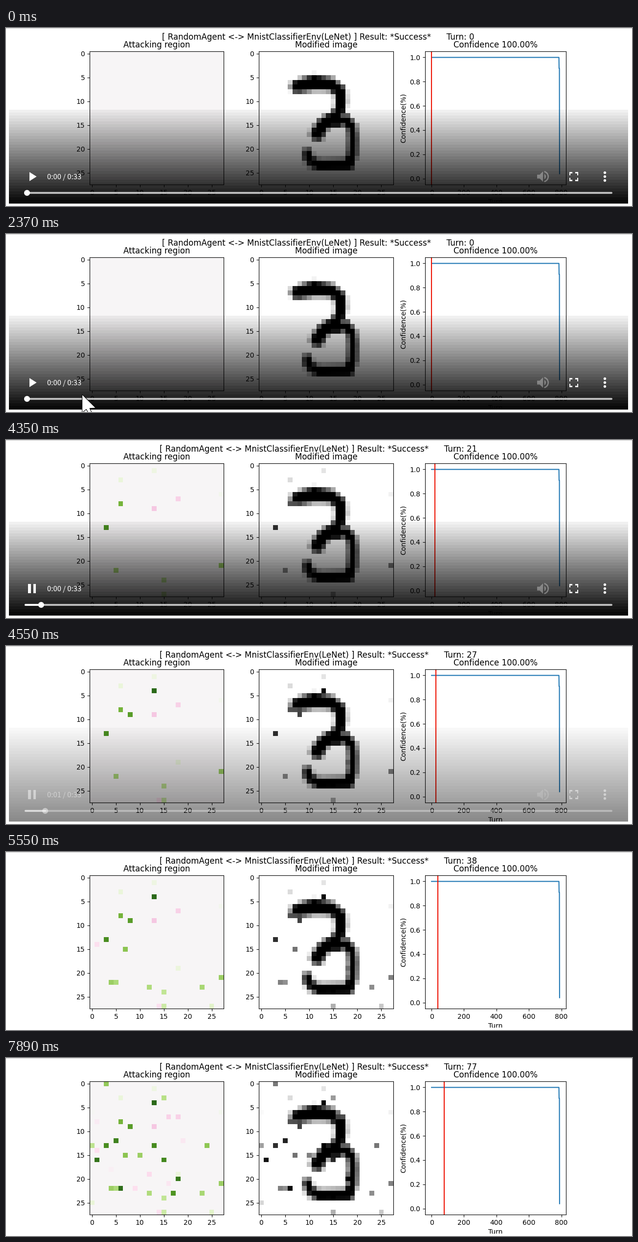
Recreate the animation shown at these times as a matplotlib script. Size 1280x366 px, loop 7990 ms.

```python
import numpy as np
import matplotlib.pyplot as plt
from matplotlib.animation import FuncAnimation
from matplotlib.patches import Circle, Polygon, Rectangle, Wedge

W, H, DPI = 1280, 366, 100
PX = 72 / DPI
FRAMES, INTERVAL = 170, 47
N = 28

# Pen strokes of the handwritten 3: x, y, pen radius in cells.
UPPER = [(8, 7.4, 1.4), (11.5, 6.6, 1.65), (14.8, 6.9, 1.4),
         (16.9, 8.3, 1.2), (17.05, 10.5, 1.15), (16.9, 12.2, 1.1),
         (16, 13.6, 1.2), (13.5, 15.2, 1.35), (12.2, 17.3, 1.45)]
LOWER = [(14.5, 14.8, 1.1), (16.5, 14.8, 1.1), (18, 14.3, 1.05),
         (19.3, 15.6, 1), (19.6, 18, 1), (19.5, 21.5, 1),
         (18.7, 23.8, 1.15), (12.5, 23.9, 1.1), (11.3, 23.4, 1.05),
         (10.3, 22.4, .95), (10.15, 21.3, .9)]

# One random cell is perturbed about every 1.8 turns.
rng = np.random.default_rng(7)
HIT_EVERY, HITS = 1.8, 44
HIT_ROW, HIT_COL = np.divmod(rng.choice(N * N, HITS, replace=False), N)
HIT_AMOUNT = rng.uniform(-.4, 1, HITS)

# Key times (ms) with their values.
CLICK = 3470
POINTER = [(170, 974, 356), (1570, 433, 337), (2470, 121, 329),
           (3270, 53, 305), (CLICK, 53, 305), (4070, 112, 367)]
TURNS = [(CLICK, 0), (4350, 21), (4550, 27), (5550, 38), (7850, 77)]
FADE = [(4350, 1), (4730, 0)]


def track(t, keys):
    times, *values = zip(*keys)
    return [np.interp(t, times, v) for v in values]


def ink(stroke):
    """Grey of each cell under a soft round pen led along the stroke."""
    y, x = np.mgrid[:N, :N] + .5
    out = np.zeros((N, N))
    for (x0, y0, r0), (x1, y1, r1) in zip(stroke, stroke[1:]):
        dx, dy = x1 - x0, y1 - y0
        s = np.clip(((x - x0) * dx + (y - y0) * dy) / (dx**2 + dy**2), 0, 1)
        dist = np.hypot(x - x0 - s * dx, y - y0 - s * dy)
        out = np.maximum(out, np.clip(r0 + s * (r1 - r0) + .5 - dist, 0, 1))
    return out


def perturbation(turn):
    k = int(turn / HIT_EVERY)
    grid = np.zeros((N, N))
    grid[HIT_ROW[:k], HIT_COL[:k]] = HIT_AMOUNT[:k]
    return grid


fig = plt.figure(figsize=(W / DPI, H / DPI), dpi=DPI, facecolor="white")
digit = np.maximum(ink(UPPER), ink(LOWER))


def add_plot(x0, x1, title, y0=48, y1=322):
    ax = fig.add_axes([x0 / W, 1 - y1 / H, (x1 - x0) / W, (y1 - y0) / H])
    ax.set_title(title)
    return ax


def add_grid(x0, x1, title, **kw):
    ax = add_plot(x0, x1, title)
    img = ax.imshow(np.zeros((N, N)), aspect="auto",
                    interpolation="nearest", **kw)
    ax.set_xticks(range(0, N, 5))
    ax.set_yticks(range(0, N, 5))
    return img


attack = add_grid(171, 445, "Attacking region", cmap="PiYG", vmin=-1, vmax=1)
modified = add_grid(517, 792, "Modified image", cmap="gray_r", vmin=0, vmax=1)

conf = add_plot(857, 1145, "Confidence 100.00%")
conf.plot([0, 785, 786, 788, 789], [1, 1, .91, .91, .04], color="#1f77b4")
marker = conf.axvline(0, color="#ee1505", lw=1.5)
conf.set_xlim(-39.45, 828.45)
conf.set_ylim(-.05, 1.05)
conf.set_xticks(range(0, 801, 200))
conf.set_xlabel("Turn")
conf.set_ylabel("Confidence(%)")

# Pixel layer for the headline, the player controls and the pointer.
top = fig.add_axes([0, 0, 1, 1], zorder=5)
top.axis("off")
headline = top.text(638.5, 24, "", fontsize=12, ha="center", va="baseline")

shade_rgba = np.zeros((33, 1, 4))
shade_rgba[:, 0, 3] = np.linspace(.06, 1, 33)
shade = top.imshow(shade_rgba, extent=(6, 1272, H, 168), aspect="auto",
                   interpolation="nearest", zorder=1)
top.set_xlim(0, W)
top.set_ylim(H, 0)

controls = []


def control(artist, alpha=1):
    artist.set_zorder(2)
    controls.append((artist, alpha))
    return artist


def icon(points, left, alpha=1):
    """Filled shape on a 24-unit icon grid drawn 32 px wide."""
    xy = np.array(points) * 4 / 3 + (left, 289.5)
    return control(top.add_patch(Polygon(xy, fc="white", ec="none")), alpha)


def bar(x0, x1, alpha=1):
    line, = top.plot([x0, x1], [339, 339], color="white", lw=4 * PX,
                     solid_capstyle="round")
    return control(line, alpha)


def dot(x, y, r):
    return control(top.add_patch(Circle((x, y), r, fc="white", ec="none")))


bar(40, 1238, .7)
played = bar(40, 43)
knob = dot(43, 339, 6)
clock_text = control(top.text(84.5, 311, "", color="white", fontsize=14.7 * PX,
                              family="Noto Sans CJK JP", va="baseline"))

play = icon([(8, 5), (8, 19), (19, 12)], 37.3)
pause = [icon([(x, 5), (x + 4, 5), (x + 4, 19), (x, 19)], 37.3)
         for x in (6, 14)]

MUTED = .33
icon([(3, 9), (7, 9), (12, 4), (12, 20), (7, 15), (3, 15)], 1082, MUTED)
arc = np.radians(np.linspace(-63, 63, 15))
icon(np.column_stack([12 + 4.5 * np.cos(arc), 12 + 4.5 * np.sin(arc)]),
     1082, MUTED)
control(top.add_patch(Wedge((1098, 305.5), 12, -76, 76, width=2.7,
                            fc="white", ec="none")), MUTED)

corner = np.array([(-7, -7), (-2, -7), (-2, -5), (-5, -5), (-5, -2), (-7, -2)])
for sx in (1, -1):
    for sy in (1, -1):
        icon(corner * (sx, sy) + 12, 1145)
for row in range(3):
    dot(1224.5, 297.5 + 8 * row, 2.7)

top.add_patch(Rectangle((0, 361), W, 5, fc="white", ec="none", zorder=3))
top.add_patch(Rectangle((0, 0), W, 1, fc="#c8c8c8", ec="none", zorder=3))

arrow = np.array([(0, 0), (0, 38), (8.5, 30.5), (15, 43), (21, 40),
                  (15.5, 28.5), (28, 28)])
pointer = top.add_patch(Polygon(arrow, fc="white", ec="black", lw=.75,
                                joinstyle="miter", zorder=4))


def draw(i):
    # The picture only changes every 100 ms.
    t = (i + 1) * INTERVAL - 1
    phase = 70 if t < 4100 else 50
    t = (t - phase) // 100 * 100 + phase

    turn = int(round(track(t, TURNS)[0]))
    noise = perturbation(turn)
    attack.set_data(noise - .01 * (noise == 0))
    modified.set_data(np.clip(digit + noise, 0, 1))
    marker.set_xdata([turn, turn])
    headline.set_text("[ RandomAgent <-> MnistClassifierEnv(LeNet) ] "
                      f"Result: *Success*      Turn: {turn}")

    x = 43 + 1.375 * turn
    knob.center = (x, 339)
    played.set_xdata([40, x])
    clock_text.set_text(f"0:{turn // 24:02d} / 0:33")

    fade = track(t, FADE)[0]
    for artist, alpha in controls:
        artist.set_alpha(alpha * fade)
    shade.set_alpha(fade)

    play.set_visible(t < CLICK)
    for p in pause:
        p.set_visible(t >= CLICK)

    pointer.set_visible(POINTER[0][0] <= t <= POINTER[-1][0])
    pointer.set_xy(arrow + track(t, POINTER))


anim = FuncAnimation(fig, draw, frames=FRAMES, interval=INTERVAL, repeat=True,
                     repeat_delay=0, blit=False)
plt.show()
```
